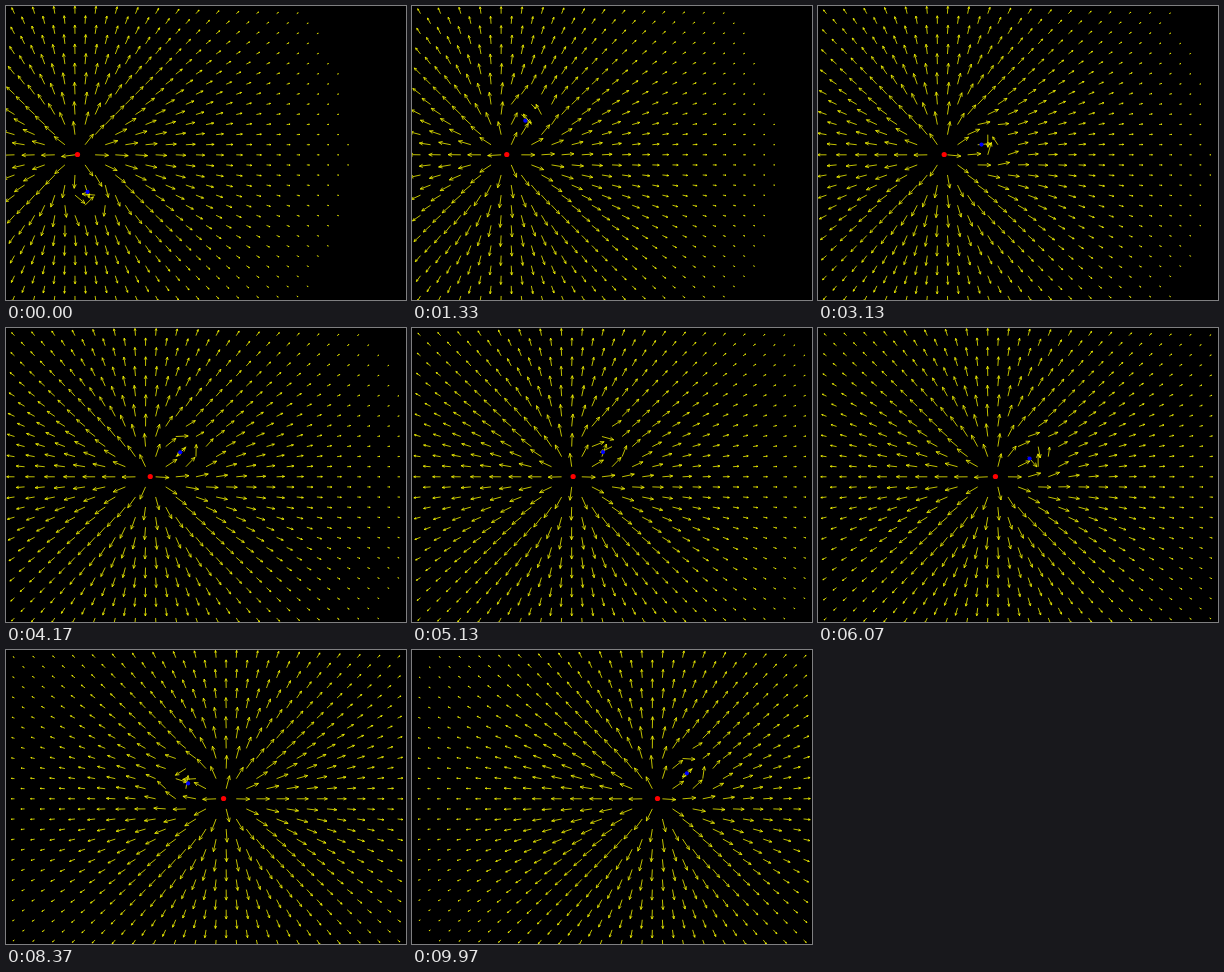
Recreate the animation shown at these times as an HTML page with a canvas. Size 400 by 294 pixels, loop 10000 ms.

```html
<!DOCTYPE html>
<html lang="en">
<head>
<meta charset="utf-8">
<title>Field of a moving proton and its electron</title>
<style>
  html, body { margin: 0; height: 100%; overflow: hidden; background: #000; }
  canvas { display: block; }
</style>
</head>
<body>
<canvas id="stage" width="400" height="294"></canvas>
<script>
const ctx = document.getElementById('stage').getContext('2d');
const LOOP = 10000, STEPS = 300, RAD = Math.PI / 180;
const GRID = { x: 8.5, y: 7.7, gap: 10.08, cols: 39, rows: 29 };
const ORBIT = 38.6;
const MAX_LENGTH = 13.5, RANGE = 190;

function dot({ x, y }, radius, color) {
  ctx.fillStyle = color;
  ctx.beginPath();
  ctx.arc(x, y, radius, 0, 2 * Math.PI);
  ctx.fill();
}

// Inverse-square field of one charge at (x, y).
function field(source, x, y, charge) {
  const dx = x - source.x, dy = y - source.y;
  const r = Math.hypot(dx, dy) || 1;
  const size = charge / r ** 3;
  return [dx * size, dy * size];
}

// Adds an open-headed arrow with its tail at (x, y) to the current path.
function arrow(x, y, angle, length) {
  const tipX = x + length * Math.cos(angle), tipY = y + length * Math.sin(angle);
  const barb = 0.33 * length;
  ctx.moveTo(x, y);
  ctx.lineTo(tipX, tipY);
  for (const side of [-0.42, 0.42]) {
    ctx.moveTo(tipX, tipY);
    ctx.lineTo(tipX - barb * Math.cos(angle + side), tipY - barb * Math.sin(angle + side));
  }
}

function draw(step) {
  const proton = { x: 71.5 + 0.582 * step, y: 148.5 };
  const mean = -74 + 12.424 * step;
  const angle = (mean - 3 + 4.5 * Math.cos((mean + 10) * RAD)) * RAD;
  const electron = {
    x: proton.x + ORBIT * Math.cos(angle),
    y: proton.y - ORBIT * Math.sin(angle)
  };

  ctx.fillStyle = '#000';
  ctx.fillRect(0, 0, 400, 294);

  ctx.strokeStyle = '#ff0';
  ctx.lineWidth = 0.75;
  ctx.beginPath();
  for (let row = 0; row < GRID.rows; row++) {
    for (let col = row % 2; col < GRID.cols; col += 2) {
      const x = GRID.x + col * GRID.gap, y = GRID.y + row * GRID.gap;
      const [px, py] = field(proton, x, y, 1);
      const [ex, ey] = field(electron, x, y, -0.1);
      const vx = px + ex, vy = py + ey;
      // Strong fields saturate, weak ones fade out.
      const length = MAX_LENGTH * Math.exp(-1 / (RANGE ** 2 * Math.hypot(vx, vy)));
      if (length > 1.4) arrow(x, y, Math.atan2(vy, vx), length);
    }
  }
  ctx.stroke();

  dot(electron, 2.1, '#00f');
  dot(proton, 2.6, '#f00');
}

const start = performance.now();
function tick() {
  const t = (performance.now() - start) % LOOP;
  draw(Math.floor((t + 4) * STEPS / LOOP) % STEPS);
  requestAnimationFrame(tick);
}
tick();
</script>
</body>
</html>
```
